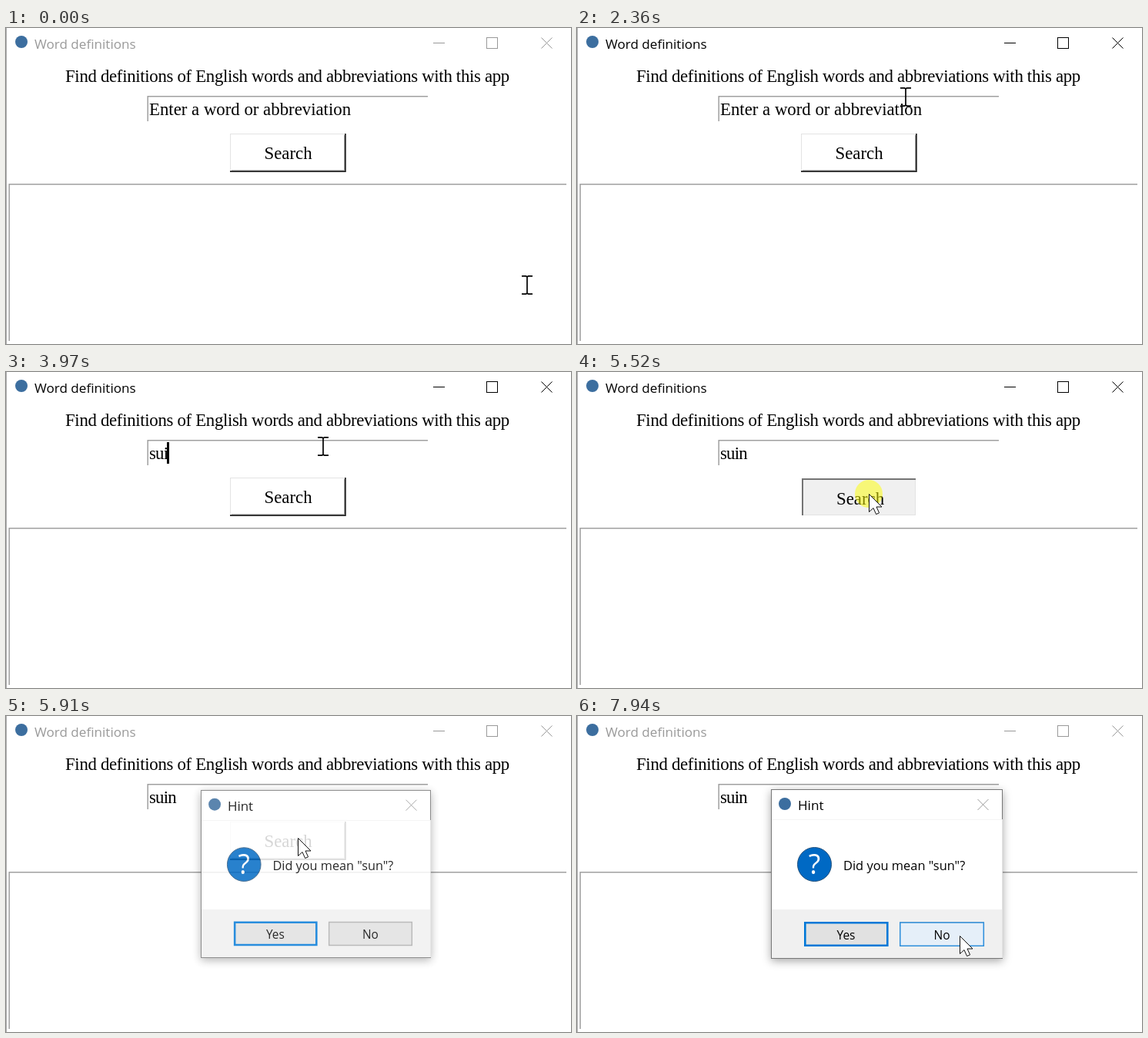
Animation of 734 by 410 pixels, one loop 8000 ms. Source, as an HTML page:

```html
<!DOCTYPE html>
<html lang="en">
<head>
<meta charset="utf-8">
<title>Word definitions</title>
<style>
  html, body { margin: 0; width: 100%; height: 100%; overflow: hidden; background: #fff; }
  svg { display: block; }
  text { white-space: pre; }
  .serif { font: 22.8px "Liberation Serif", serif; }
  .heading { letter-spacing: -.31px; }
  .sans { font: 17.1px "Open Sans", sans-serif; }
  .message { font-size: 16.4px; }
  .label { font-size: 15.5px; text-anchor: middle; }
  .crisp { shape-rendering: crispEdges; }
  .controls { fill: none; stroke: currentColor; }
  #dialog { transform-origin: 402.5px 205px; filter: drop-shadow(0 3px 6px rgba(0, 0, 0, .35)); }
</style>
</head>
<body>
<svg width="734" height="410" viewBox="0 0 734 410">
  <path class="crisp" d="M.5 0V410" stroke="#aaa"/>

  <circle cx="20" cy="18" r="8" fill="#3c6e9f"/>
  <g id="titlebar">
    <text class="sans" x="37" y="27" fill="currentColor">Word definitions</text>
    <path class="controls crisp" d="M555 19.5h15M624.5 12.5h14v14h-14z"/>
    <path class="controls" d="M695.5 12.5l14 14m0-14l-14 14"/>
  </g>

  <text class="serif heading" x="77" y="70">Find definitions of English words and abbreviations with this app</text>

  <path d="M548 88.7H184.2V121M728 202.8H4.2V406" fill="none" stroke="#a0a0a0" stroke-width="1.5"/>
  <text id="entry" class="serif" x="186" y="113"></text>
  <rect id="caret" y="91" width="3" height="28"/>

  <g id="raised">
    <path class="crisp" d="M291.5 186V137.5H441" fill="none" stroke="#e3e3e3"/>
    <path d="M293 184.8H439.5V139" fill="none" stroke="#a0a0a0"/>
    <path d="M291 186.1H440.9V137" fill="none" stroke="#222" stroke-width="1.7"/>
  </g>
  <g id="sunken">
    <path class="crisp" d="M292 138h148v48h-148z" fill="#f0f0f0"/>
    <path class="crisp" d="M292 185.5H439.5V138" fill="none" stroke="#e3e3e3"/>
    <path class="crisp" d="M293 186V139H440" fill="none" stroke="#747474" stroke-width="2"/>
  </g>
  <text id="search" class="serif" x="335.5" y="170">Search</text>

  <g id="dialog">
    <path class="crisp" d="M252.5 95.5h300v219h-300z" fill="#fff" stroke="#777"/>
    <path class="crisp" d="M253 251h300v63h-300z" fill="#f0f0f0"/>
    <path class="crisp" d="M253 134.5h300" stroke="#f4f4f4"/>
    <path class="crisp" d="M552.5 134v180" stroke="#e4e4e4"/>
    <circle cx="270" cy="114" r="8" fill="#3c6e9f"/>
    <text class="sans" x="287" y="122">Hint</text>
    <path d="M520.5 108l14 14m0-14l-14 14" stroke="#999"/>
    <circle cx="308.5" cy="192.5" r="22" fill="#0069c4" stroke="#24527c"/>
    <text class="sans" x="308.5" y="205" fill="#fff" text-anchor="middle" style="font-size:36px">?</text>
    <text class="sans message" x="346" y="200">Did you mean "sun"?</text>
    <path d="M296.3 268.3h107v29.5h-107z" fill="#e1e1e1" stroke="#0078d7" stroke-width="2.6"/>
    <path d="M419.8 268h108.5v30.3h-108.5z" fill="#e1e1e1" stroke="#adadad" stroke-width="1.5"/>
    <path id="hover" d="M419.8 268h108.5v30.3h-108.5z" fill="#e5eff9" stroke="#2f8fdc" stroke-width="1.5"/>
    <text class="sans label" x="349.5" y="290">Yes</text>
    <text class="sans label" x="474" y="290">No</text>
  </g>

  <g id="cursor">
    <circle id="click" r="18" fill="#ff0" opacity=".5"/>
    <path id="arrow" d="M.5.5V23.5L6 18.5l3.6 8 4-1.7-3.6-7.8H17z" fill="#fff" stroke="#111"/>
    <path id="beam" d="M-7-12.2h5.5L0-11l1.5-1.2H7M0-11V10M-7 11.2h5.5L0 10l1.5 1.2H7" fill="none" stroke="#000" stroke-width="1.7"/>
  </g>
</svg>
<script>
const LOOP = 8000;
const $ = id => document.getElementById(id);
const show = (id, on) => { $(id).style.display = on ? "" : "none"; };
const within = (t, spans) => spans.some(([from, to]) => t >= from && t < to);
const clamp = v => Math.max(0, Math.min(1, v));
const smooth = p => p * p * (3 - 2 * p);
const stepped = (t, start, stepMs, steps) =>
  clamp((Math.floor((t - start) / stepMs) + 1) / steps);

// start, step length, steps, target x, target y
const moves = [
  [70, 70, 5, 641, 186],
  [2050, 77, 5, 427, 90],
  [2436, 77, 3, 413, 92],
  [2740, 77, 1, 412, 97],
  [4970, 82, 5, 379, 158],
  [7070, 80, 11, 497, 285],
];
// time, entry text, caret x
const typing = [
  [0, "Enter a word or abbreviation", 0],
  [2950, "", 185],
  [3740, "s", 195],
  [3890, "su", 204],
  [3970, "sui", 209],
  [4300, "suin", 220],
];
const clicks = [[770, 920], [2950, 3050], [5520, 5650]];
const caretOn = [[2950, 3510], [3820, 4450], [4760, 5300]];
const active = [[770, 5750]];
const pressed = [[5520, 5600]];
const DIALOG_START = 5750;

function cursorAt(t) {
  let x = 677, y = 334;
  for (const [start, stepMs, steps, toX, toY] of moves) {
    if (t < start) break;
    const p = smooth(stepped(t, start, stepMs, steps));
    x += (toX - x) * p;
    y += (toY - y) * p;
  }
  return [x, y];
}

function draw(t) {
  $("titlebar").style.color = within(t, active) ? "#000" : "#999";

  const [, text, caretX] = typing.findLast(entry => t >= entry[0]);
  $("entry").textContent = text;
  $("entry").setAttribute("letter-spacing", text.length > 4 ? 0 : -.8);
  $("caret").setAttribute("x", caretX);
  show("caret", within(t, caretOn));

  const down = within(t, pressed);
  show("raised", !down);
  show("sunken", down);
  $("search").setAttribute("transform", down ? "translate(1.5 1.5)" : "");

  const fade = 1 - (1 - stepped(t, DIALOG_START, 77, 5)) ** 2;
  show("dialog", t >= DIALOG_START);
  $("dialog").style.opacity = fade;
  $("dialog").style.transform = `scale(${.95 + .05 * fade})`;
  $("hover").style.opacity = clamp((t - 7680) / 260);

  const [x, y] = cursorAt(t);
  const overEntry = x > 184 && x < 548 && y > 88 && y < 121;
  const overText = y > 203 && t < DIALOG_START;
  $("cursor").setAttribute("transform", `translate(${Math.round(x)} ${Math.round(y)})`);
  show("beam", overEntry || overText);
  show("arrow", !overEntry && !overText);
  show("click", within(t, clicks));
}

const begin = performance.now();
function tick() {
  draw((performance.now() - begin) % LOOP);
  requestAnimationFrame(tick);
}
tick();
</script>
</body>
</html>
```
